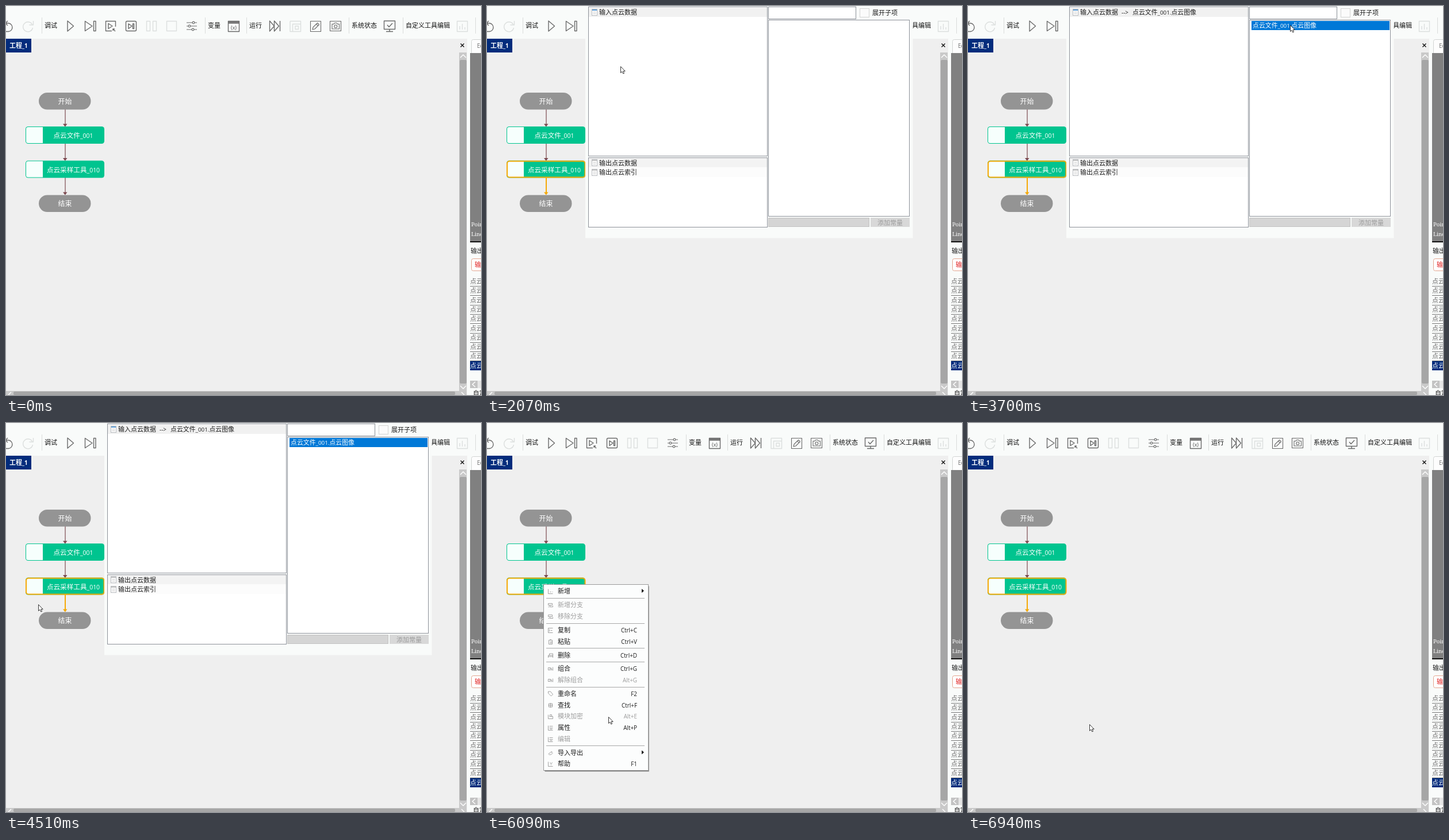
An HTML page for the animation above (8 s loop, 826 by 678 pixels).

```html
<!DOCTYPE html>
<html lang="zh">
<head>
<meta charset="utf-8">
<title>Flow editor</title>
<style>
html, body { margin: 0; width: 100%; height: 100%; overflow: hidden; background: #f9fbfa; }
svg { display: block; width: 826px; height: 678px; }
text { font: 11px "Open Sans", "Noto Sans CJK SC", "Noto Sans CJK", sans-serif; white-space: pre; }
.a { font-size: 90%; }
.bold { font-weight: 700; }
.serif { font-family: "Noto Serif", serif; }
.ico { fill: none; stroke: #6a6a6a; stroke-width: 1.4; stroke-linejoin: round; }
.fine { stroke-width: 1.1; }
.off { stroke: #dcdfde; }
.tiny { fill: none; stroke: #8c8c8c; stroke-width: .8; }
</style>
</head>
<body>
<svg id="stage" viewBox="0 0 826 678"></svg>
<script>
const LOOP = 8000;

// ---- drawing helpers ----
const rect = (x, y, w, h, fill, more = '') =>
  `<rect x="${x}" y="${y}" width="${w}" height="${h}" fill="${fill}" ${more}/>`;
const box = (x, y, w, h, fill, stroke, more = '') =>
  rect(x + .5, y + .5, w - 1, h - 1, fill, `stroke="${stroke}" ${more}`);
const path = (d, cls = 'ico', more = '') => `<path d="${d}" class="${cls}" ${more}/>`;
const esc = s => s.replace(/</g, '&lt;').replace(/>/g, '&gt;');

// y is the vertical middle of the line; Latin runs are set a little smaller
function text(x, y, s, { size = 11, fill = '#1c1c1c', anchor = 'start', more = '' } = {}) {
  const body = s.split(/([!-~]+)/).map(p =>
    /^[!-~]/.test(p) ? `<tspan class="a">${esc(p)}</tspan>` : p).join('');
  return `<text x="${x}" y="${y + size * .37}" fill="${fill}" text-anchor="${anchor}" ` +
    `style="font-size:${size}px" ${more}>${body}</text>`;
}
const group = (id, body, more = '') => `<g id="${id}" ${more}>${body}</g>`;

// ---- toolbar ----
function toolbar() {
  const labels = [[67, '调试'], [351, '变量'], [423, '运行'], [601, '系统状态'], [695, '自定义工具编辑']];
  const bars = [62, 346, 418, 596, 690, 816];
  const knobs = [[29, 326], [35, 319], [41, 325]];
  return rect(0, 0, 826, 57, '#f9fbfa') +
    bars.map(x => rect(x, 20, 1, 28, '#dadcdb')).join('') +
    labels.map(([x, s]) => text(x, 34, s, { fill: '#111' })).join('') +
    path('M-2 30H4.500a7.300 7.300 0 0 1 0 14.500H-1M3 26L-1 30L3 34') +
    path('M46 33A8.500 8.500 0 1 0 46.500 38M47.500 26V33H40.500', 'ico off') +
    path('M107 26L117.500 35L107 44Z') +
    path('M137.500 26.500V43.500L150 35ZM152.500 26.500H156V43.500H152.500Z') +
    path('M190.500 36V26.500H173.500V43.500H184M178 30.500V39.500L185 35ZM190 44L186 40M186 43V40H189') +
    path('M210.500 26.500H224.500Q226.500 26.500 226.500 28.500V41.500Q226.500 43.500 224.500 43.500H210.500' +
      'Q208.500 43.500 208.500 41.500V28.500Q208.500 26.500 210.500 26.500ZM213 31V39.500L219 35ZM220.500 31H222.500V39.500H220.500Z') +
    path('M244.500 26.500H250.500V43.500H244.500ZM255.500 26.500H261.500V43.500H255.500ZM279.500 26.500H296.500V43.500H279.500Z', 'ico off') +
    knobs.map(([y, x]) => path(`M314 ${y}H${x - 2}M${x + 2} ${y}H332`, 'ico fine') +
      `<circle cx="${x}" cy="${y}" r="1.900" class="ico fine"/>`).join('') +
    path('M386.500 26.500H405.500V44.500H386.500ZM386.500 30H405.500') + rect(387, 27, 18, 3, '#777') +
    text(396, 37, '(x)', { size: 10, fill: '#555', anchor: 'middle' }) +
    path('M458.500 26V44L466.500 35ZM466.500 26V44L474.500 35ZM476.500 26V44') +
    path('M494 26.500H512.500V31M494 26.500V44.500H498M498.500 31.500H512.500V44.500H498.500ZM503 35H508.500V40.500H503Z', 'ico off') +
    path('M529.500 26.500H547.500V44.500H529.500ZM533 41L534 37L541.500 29.500L544.500 32.500L537 40ZM539.500 31.500L542.500 34.500', 'ico fine') +
    path('M563.500 26.500H582.500V43.500H563.500ZM567 31.500H570L571.500 29.500H575L576.500 31.500H579.500V40H567Z', 'ico fine') +
    '<circle cx="573.300" cy="35.500" r="2.500" class="ico fine"/>' +
    path('M657.500 26H676.500V40.500H657.500ZM667 40.500V44M661 44.500H673M663 33L666 36.500L672 30') +
    path('M784.500 26.500H802.500V44.500H784.500ZM789 41V35M793.500 41V31M798 41V37', 'ico off');
}

// ---- canvas with scroll bars ----
function canvas() {
  return rect(0, 57, 802, 621, '#efefef') +
    rect(0, 57, 44, 24, '#022c7c') +
    text(6, 69, '工程_1', { fill: '#fff', more: 'class="bold"' }) +
    path('M790.500 65.500L796.500 71.500M796.500 65.500L790.500 71.500', 'ico', 'style="stroke:#111"') +
    rect(788, 81, 13, 597, '#c9c9c9') + rect(789, 94, 12, 564, '#a6a6a6', 'rx="2"') +
    path('M790 90L795 85L800 90M790 662L795 667L800 662M792 673L797 678', 'ico', 'style="stroke:#fff"') +
    rect(0, 671, 788, 7, '#c9c9c9') + rect(13, 672, 768, 6, '#a6a6a6', 'rx="2"') +
    path('M9 673L4 678', 'ico', 'style="stroke:#fff"');
}

function sidePanel() {
  let s = rect(802, 57, 24, 621, '#f9fbfa') +
    box(809, 58, 30, 30, '#fdfdfd', '#d2d4d3', 'rx="3"') + text(819, 69, 'Edit', { fill: '#777' }) +
    rect(807, 82, 19, 329, '#808080') + rect(807, 410, 19, 2, '#111');
  [['Points', 381], ['Lines', 398]].forEach(([w, y]) =>
    s += `<text x="809" y="${y + 3}" fill="#fff" class="serif" style="font-size:9.500px">${w}</text>`);
  s += text(808, 427, '输出') + box(809, 440, 40, 22, '#fff', '#e3a58f', 'rx="3"') +
    text(815, 451, '输出', { fill: '#e02020' });
  for (let i = 0; i < 10; i++) {
    const y = 480 + i * 16.3, last = i === 9;
    s += last ? rect(807, 619, 19, 16, '#022c7c') : rect(807, Math.round(y + 8), 19, 1, '#777');
    s += text(807, y, '点云采样', { fill: last ? '#fff' : '#6e6e6e' });
  }
  return s + rect(807, 653, 13, 13, '#c3c3c3') + rect(820, 653, 6, 13, '#e6e6e6') +
    path('M816 655L811 659.500L816 664', 'ico', 'style="stroke:#fff"') + text(812, 675, '自定义');
}

// ---- flow chart ----
const pill = (y, s) => rect(57, y, 90.5, 29.5, '#949494', 'rx="14.700"') +
  text(102.5, y + 15.5, s, { size: 12, fill: '#fff', anchor: 'middle' });
const node = (y, s) => rect(34, y, 137, 30, '#00c48f', 'rx="4.500"') +
  `<path d="M64 ${y + 1}H38.500q-3.500 0 -3.500 3.500v21q0 3.500 3.500 3.500H64Z" fill="#f6fffd"/>` +
  text(117, y + 16, s, { size: 11.6, fill: '#fff', anchor: 'middle' });
const link = (y, end, color, w) => rect(103 - w / 2, y, w, end - y - 4, color) +
  `<path d="M99 ${end - 5}H106.500L102.800 ${end}Z" fill="${color}"/>`;

function flow() {
  return link(180, 210.5, '#7c4a50', 1.2) + link(240, 270, '#7c4a50', 1.2) +
    group('plain', link(299, 329.5, '#7c4a50', 1.2)) +
    pill(151, '开始') + node(210, '点云文件_001') + node(269.5, '点云采样工具_010') + pill(329.5, '结束') +
    group('picked', rect(35, 270.5, 135.5, 28, 'none', 'rx="4" stroke="#f5a906" stroke-width="2"') +
      link(299, 329.5, '#f5a906', 2));
}

// ---- link dialog ----
const sheet = (y, color) => box(182, y - 6, 10, 12, '#fff', '#b9bcc0') +
  rect(183, y - 5, 8, 2, color) + path(`M184.500 ${y - .5}h5M184.500 ${y + 2.5}h5`, 'tiny', 'opacity=".6"');

function dialog() {
  const edge = '#8d9199', item = '点云文件_001.点云图像';
  return rect(171, 0, 569.5, 404.5, '#f9fbfa') +
    box(176, 1, 312, 261, '#fff', edge) + box(176, 264, 312, 122, '#fff', edge) +
    box(489, 1, 153, 22, '#fff', edge) + box(489, 24, 246, 343, '#fff', edge) +
    box(648, 4, 17, 16, '#fbfbfb', '#d4d4d4') + text(670, 12, '展开子项') +
    box(489, 369, 176, 16, '#d5d5d5', '#c2c2c2') + rect(667, 369, 68, 16, '#d8d8d8') +
    text(701, 377.5, '添加常量', { fill: '#9b9b9b', anchor: 'middle' }) +
    rect(177, 3, 310, 16, '#f1f1f1') +
    group('inPicked', rect(193, 3, 292, 16, '#0078d7')) + sheet(11, '#5f9fd8') +
    group('inWhite', text(195, 11, '输入点云数据', { fill: '#fff' })) +
    group('inBlack', text(195, 11, '输入点云数据')) +
    group('bound', text(267, 11, '-->') + text(286, 11, item, { size: 10.9 })) +
    rect(177, 265, 310, 16, '#f3f3f3') + rect(177, 281, 310, 17, '#fcfcfc') +
    sheet(273, '#c4c4c4') + text(195, 273.5, '输出点云数据') +
    sheet(290, '#c4c4c4') + text(195, 290, '输出点云索引') +
    group('item', rect(491, 26, 243, 16, '#f2f2f2') + text(495, 34, item, { size: 10.9 })) +
    group('itemOn', rect(493, 26, 240, 16, '#0078d7') + text(495, 34, item, { size: 10.9, fill: '#fff' })) +
    group('hint', text(176, 395, '输入点云数据', { fill: '#444' }) +
      text(246, 395, '(class scVoxelPointCloud<struct stVW_PointXYZ,struct stVW_NormalIJK>)', { size: 10.8, fill: '#444' }));
}

// ---- context menu: middle y, label, shortcut, enabled, icon ----
const glyphs = {
  add: 'M-4 -4V4H4M-1 1H1M3 1H4',
  branch: 'M-4 -3H3V0H-4ZM-1 0V3H4V1M-4 3H-2',
  copy: 'M-4 -4V4H4M-4 -4H4M-2 -2V2M0 0H3',
  paste: 'M-3 -3H3V4H-3ZM-1 -4H1M-1 0H3M-1 2H2',
  cut: 'M-4 4V0H4V4M-2 0V-3H4V0M-4 2H4',
  join: 'M-4 -2H-1V2H-4ZM0 -2L3 2M4 -3V3M1 -2V3',
  tag: 'M-4 -4H0L4 1L1 4L-4 -1Z',
  find: 'M-3 -3H3V3H-3ZM-4 0H4M0 -4V4',
  lock: 'M-4 -3V4H4V0H-2M-1 0V-3H2V0',
  list: 'M-4 -4V4H4M-2 -3H4M-2 0H4M-1 2H3',
  swap: 'M-4 2L0 -1H3L1 -3M4 0L1 3H-3',
  help: 'M-4 -4V4H4M-1 -3L1 0L3 -3M1 1V2'
};
const items = [
  [293, '新增', '>', 1, 'add'], [317, '新增分支', '', 0, 'branch'], [337, '移除分支', '', 0, 'branch'],
  [361, '复制', 'Ctrl+C', 1, 'copy'], [381, '粘贴', 'Ctrl+V', 1, 'paste'], [404.5, '删除', 'Ctrl+D', 1, 'cut'],
  [428, '组合', 'Ctrl+G', 1, 'join'], [448, '解除组合', 'Alt+G', 0, 'join'], [471.5, '重命名', 'F2', 1, 'tag'],
  [491.5, '查找', 'Ctrl+F', 1, 'find'], [511, '模块加密', 'Alt+E', 0, 'lock'], [531, '属性', 'Alt+P', 1, 'list'],
  [551, '编辑', '', 0, 'list'], [574.5, '导入导出', '>', 1, 'swap'], [594, '帮助', 'F1', 1, 'help']
];
const row = ([y, label, key, on, icon]) => {
  const fill = on ? '#1c1c1c' : '#9d9d9d';
  const right = key === '>' ? `<path d="M269 ${y - 4}L273 ${y - .5}L269 ${y + 3}Z" fill="#111"/>`
    : text(261, y, key, { fill, anchor: 'end' });
  return path(glyphs[icon], 'tiny', `transform="translate(110.500 ${y + .5})"`) + text(123, y, label, { fill }) + right;
};
const lit = it => rect(100, it[0] - 10, 178, 19.5, '#91c9f7') + row(it);

function menu() {
  return rect(101, 285, 181, 323, '#000', 'opacity=".18"') + rect(100, 284, 181.5, 323, '#000', 'opacity=".4"') +
    box(98, 281, 183, 325, '#fcfdfd', '#9b9b9b') +
    [305, 349, 392, 416, 460, 562].map(y => rect(103, y, 171, 1, '#a8a8a8')).join('') +
    items.map(row).join('') +
    items.map((it, i) => it[3] ? group('lit' + i, lit(it)) : '').join('');
}

const pointer = group('pointer',
  '<path d="M.5 .5V11.500L3 9.200L4.800 13L6.600 12.200L5 8.500H8.200Z" fill="#fff" stroke="#222" stroke-width=".9"/>');

document.getElementById('stage').innerHTML = toolbar() + canvas() + sidePanel() + flow() +
  group('dialog', dialog()) + group('menu', menu()) + group('chosen', lit(items[11])) + pointer;

// ---- motion: time, x, y ----
const trail = [
  [0, 775, 690], [200, 766, 682], [1000, 113, 273], [1640, 113, 273], [2370, 300, 8], [2540, 300, 8],
  [2970, 490, 33], [3210, 560, 33], [3720, 560, 33], [4350, 180, 248], [4510, 56, 316], [4640, 53, 318],
  [4970, 88, 270], [5170, 88, 270], [5260, 98, 282], [5410, 98, 282], [5960, 211, 500], [6090, 211, 512],
  [6420, 211, 525], [8000, 211, 525]
];
const slope = (i, k) => (trail[i + 1][k] - trail[i][k]) / (trail[i + 1][0] - trail[i][0]);
function tangent(i, k) {
  if (i === 0 || i === trail.length - 1) return 0;
  const a = slope(i - 1, k), b = slope(i, k);
  return a * b > 0 ? 2 * a * b / (a + b) : 0;
}
// monotone cubic through the trail points
function along(t, k) {
  let i = 0;
  while (i < trail.length - 2 && t >= trail[i + 1][0]) i++;
  const [p, q] = [trail[i], trail[i + 1]], d = q[0] - p[0], u = (t - p[0]) / d, v = 1 - u;
  return Math.round(v * v * (1 + 2 * u) * p[k] + u * u * (3 - 2 * u) * q[k] +
    d * u * v * (v * tangent(i, k) - u * tangent(i + 1, k)));
}

const el = id => document.getElementById(id);
const show = (id, on) => { el(id).style.display = on ? '' : 'none'; };
const during = (t, a, b) => t >= a && t < b;

function draw(t) {
  const x = along(t, 1), y = along(t, 2), picked = t >= 1100;
  el('pointer').setAttribute('transform', `translate(${x} ${y})`);
  show('picked', picked);
  show('plain', !picked);

  const asking = during(t, 2440, 3560), bound = t >= 3560;
  show('dialog', during(t, 1600, 4700));
  show('inPicked', asking);
  show('inWhite', asking);
  show('inBlack', !asking);
  show('hint', asking);
  show('item', asking);
  show('itemOn', bound);
  show('bound', bound);

  show('menu', during(t, 5290, 6770));
  el('menu').style.opacity = Math.min(1, (t - 5270) / 100);
  items.forEach(([mid, , , on], i) => {
    if (on) show('lit' + i, y >= mid - 10 && y < mid + 10);
  });
  show('chosen', during(t, 6770, 6930));
  el('chosen').style.opacity = (6930 - t) / 160;
}

const start = performance.now();
function tick() {
  draw((performance.now() - start) % LOOP);
  requestAnimationFrame(tick);
}
tick();
</script>
</body>
</html>
```
